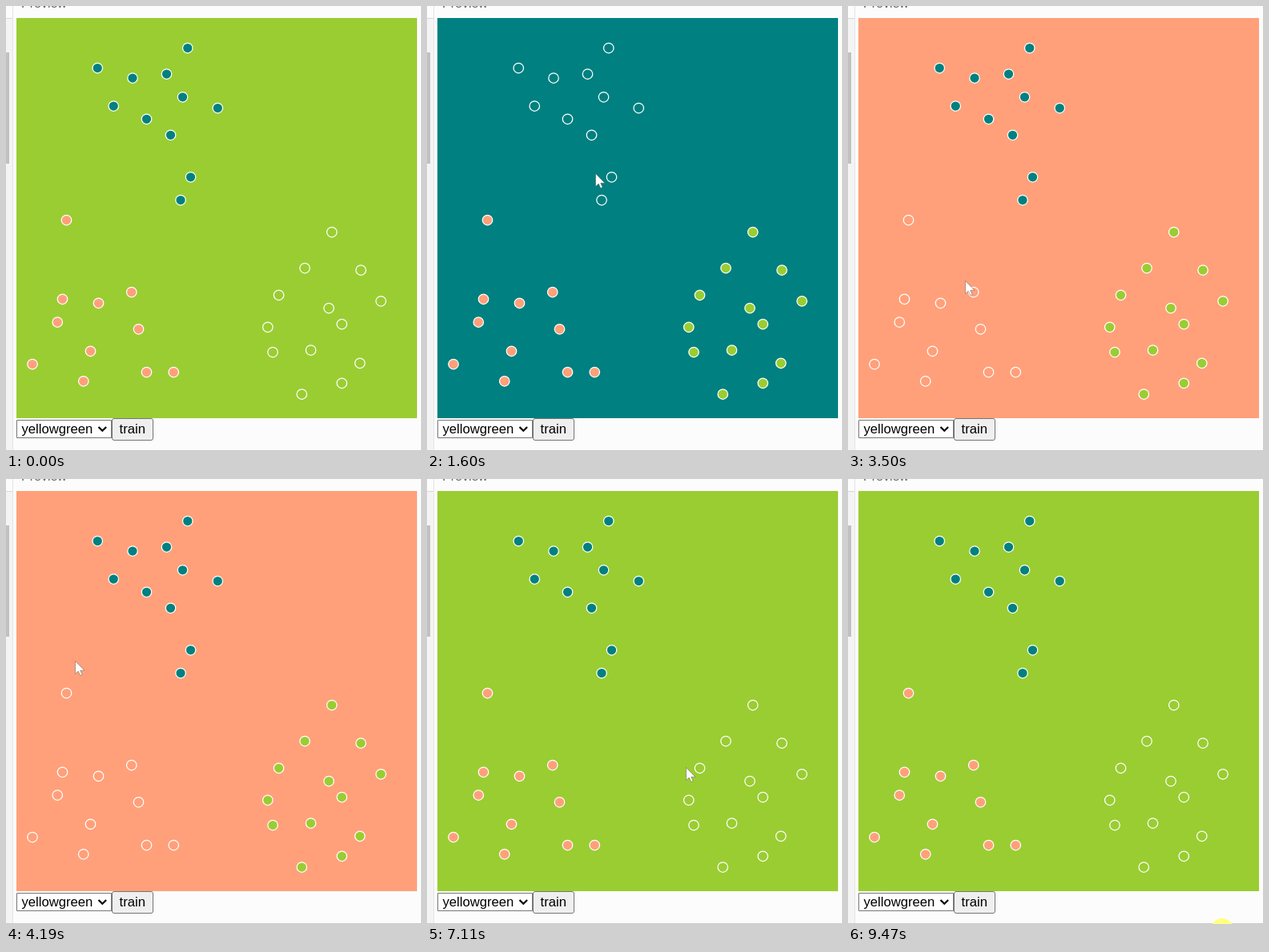
Recreate the animation shown at these times as an HTML page with a canvas. Size 518 by 556 pixels, loop 9.6 s.

```html
<!DOCTYPE html>
<html lang="en">
<head>
<meta charset="utf-8">
<title>Point classifier</title>
<style>
  html, body { margin: 0; width: 100%; height: 100%; overflow: hidden; background: #fcfcfc; }
  canvas { display: block; }
</style>
</head>
<body>
<canvas id="stage" width="518" height="556"></canvas>
<script>
const ctx = document.getElementById('stage').getContext('2d');
const LOOP = 9600, ZOOM = 1.25;
const FONT = '"Liberation Sans", Arial, sans-serif';

// Hand-placed samples in plot units (the plot is 400 x 400); center steers the classifier
const groups = [
  { color: '#008080', center: [200, 100], samples:
    '171,30 81,50 116,60 150,56 166,79 201,90 97,88 130,101 154,117 174,159 164,182' },
  { color: '#ffa07a', center: [110, 370], samples:
    '50,202 46,281 115,274 82,285 41,304 122,311 74,333 16,346 130,354 157,354 67,363' },
  { color: '#9acd32', center: [420, 390], samples:
    '315,214 288,250 344,252 262,277 364,283 312,290 325,306 251,309 256,334 294,332 343,345 325,365 285,376' }
];
for (const g of groups) g.points = g.samples.split(' ').map(p => p.split(',').map(Number));

const linear = u => u;
const easeOut = u => 1 - (1 - u) ** 3;

// Pointer strokes: quick flicks between the classes, then a slow walk along the borders
const rest = [[441, 666], [150, 420], [212, 201], [395, 380], [115, 480]];
const flick = (from, to, i) => ({ from, to, ease: easeOut, points: [rest[i], rest[i + 1]] });
const strokes = [
  flick(450, 730, 0),
  flick(1320, 1740, 1),
  flick(2020, 2430, 2),
  flick(2690, 3100, 3),
  { from: 3300, to: 4400, ease: linear, points:
    [rest[4], [150, 330], [200, 190], [150, 155], [88, 225], [70, 247]] },
  { from: 4530, to: 8940, ease: linear, points:
    [[70, 247], [122, 290], [181, 389], [228, 422], [277, 428],
     [315, 372], [339, 323], [326, 231], [422, 411], [465, 557]] }
];

// Catmull-Rom curve through evenly timed points, mirrored at its ends
function spline(points, u) {
  const n = points.length - 1;
  const i = Math.min(n - 1, Math.floor(u * n));
  const f = u * n - i;
  return [0, 1].map(c => {
    const b = points[i][c], d = points[i + 1][c];
    const a = i > 0 ? points[i - 1][c] : 2 * b - d;
    const e = i + 2 <= n ? points[i + 2][c] : 2 * d - b;
    return b + f / 2 * (d - a + f * (2 * a - 5 * b + 4 * d - e + f * (3 * (b - d) + e - a)));
  });
}

function pointerAt(t) {
  const s = strokes.findLast(k => t >= k.from) || strokes[0];
  const u = Math.min(1, Math.max(0, (t - s.from) / (s.to - s.from)));
  return spline(s.points, s.ease(u)).map(Math.round);
}

function classify([x, y]) {
  const dist = g => Math.hypot(x - g.center[0], y - g.center[1]);
  return groups.reduce((best, g) => dist(g) < dist(best) ? g : best);
}

function rect(x, y, w, h, color) {
  ctx.fillStyle = color;
  ctx.fillRect(x, y, w, h);
}

function box(x, y, w, h, radius, fill) {
  ctx.beginPath();
  ctx.roundRect(x + 0.5, y + 0.5, w - 1, h - 1, radius);
  ctx.fillStyle = fill;
  ctx.fill();
  ctx.strokeStyle = '#767676';
  ctx.lineWidth = 1;
  ctx.stroke();
}

function text(str, x, y, size, color) {
  ctx.font = `${size}px ${FONT}`;
  ctx.fillStyle = color;
  ctx.fillText(str, x, y);
}

function trace(points) {
  ctx.beginPath();
  points.forEach(([x, y]) => ctx.lineTo(x, y));
}

function drawPage() {
  rect(0, 0, 518, 556, '#fcfcfc');
  rect(0, 15, 8, 541, '#f4f4f4');
  rect(0, 15, 8, 1, '#d8d8d8');
  rect(8, 0, 1, 556, '#e4e4e4');
  rect(0, 58, 4, 139, '#c1c1c1');
  rect(0, 555, 518, 1, '#c8c8c8');
  text('Preview', 19, 2, 16, '#666');

  box(13, 517, 119, 23, 0, '#fff');
  text('yellowgreen', 19.5, 534, 16.667, '#000');
  trace([[115.5, 526], [120.3, 530.8], [125.1, 526]]);
  ctx.strokeStyle = '#000';
  ctx.lineWidth = 2.2;
  ctx.stroke();

  box(132, 515, 52, 28, 2.5, '#efefef');
  text('train', 141.5, 534, 16.667, '#000');
}

function drawPlot(color) {
  ctx.save();
  ctx.translate(13, 15);
  ctx.scale(ZOOM, ZOOM);
  rect(0, 0, 400, 400, color);
  ctx.strokeStyle = '#fff';
  ctx.lineWidth = 1;
  for (const g of groups) {
    ctx.fillStyle = g.color;
    for (const [x, y] of g.points) {
      ctx.beginPath();
      ctx.arc(x, y, 5, 0, Math.PI * 2);
      ctx.fill();
      ctx.stroke();
    }
  }
  ctx.restore();
}

function drawPointer([x, y]) {
  ctx.save();
  ctx.translate(x + 0.5, y + 0.5);
  trace([[0, 0], [0, 16], [3.7, 12.6], [6.2, 18], [8.6, 17], [6.2, 11.7], [11.4, 11.7]]);
  ctx.closePath();
  ctx.fillStyle = '#fff';
  ctx.fill();
  ctx.strokeStyle = 'rgba(60, 60, 60, 0.4)';
  ctx.lineWidth = 1;
  ctx.stroke();
  ctx.restore();
}

function draw(t) {
  const pos = pointerAt(t);
  drawPage();
  drawPlot(classify(pos).color);
  if (t >= 520 && t < 8940) drawPointer(pos);
  if (t >= 9470) {
    ctx.beginPath();
    ctx.arc(467, 563, 14, 0, Math.PI * 2);
    ctx.fillStyle = '#ffff80';
    ctx.fill();
  }
}

const began = performance.now();
function tick() {
  draw((performance.now() - began) % LOOP);
  requestAnimationFrame(tick);
}
tick();
</script>
</body>
</html>
```
